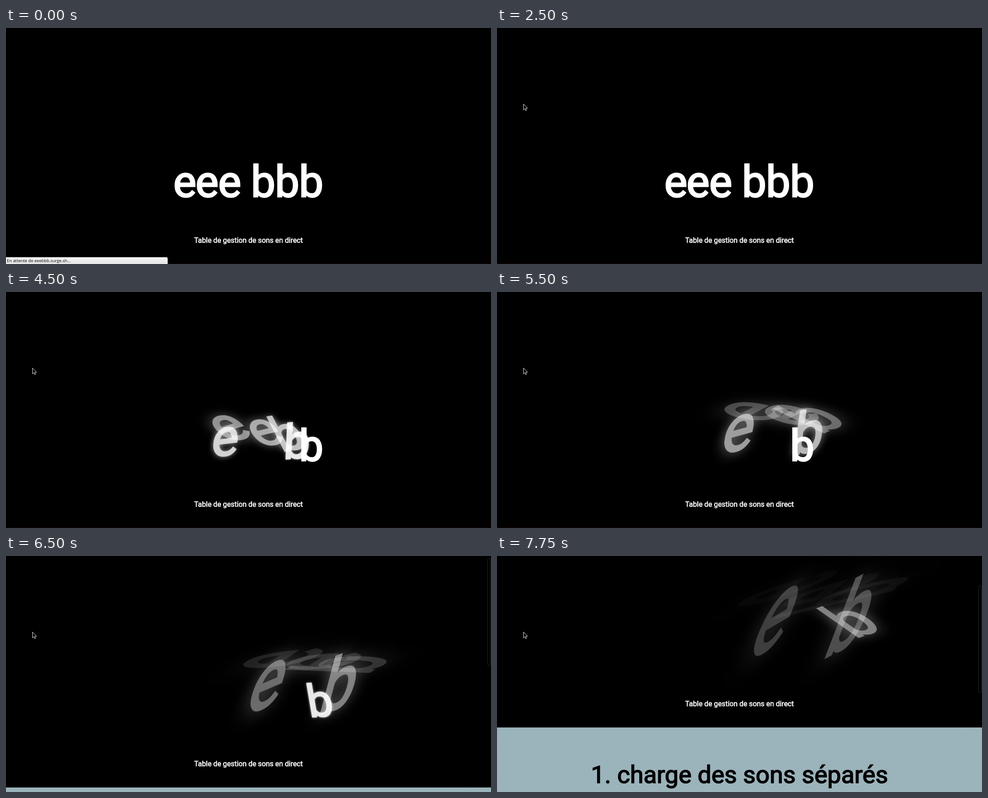
Recreate the animation shown at these times as an HTML page. Size 1071 px wide and 523 px high, loop 8 s.

```html
<!DOCTYPE html>
<html lang="fr">
<head>
<meta charset="utf-8">
<title>eee bbb</title>
<style>
  html, body { margin: 0; width: 100%; height: 100%; overflow: hidden; background: #000; }
  body, #page { position: relative; font-family: Roboto, sans-serif; }
  #page { width: 1071px; height: 523px; }
  #page *, body > * { position: absolute; white-space: pre; }
  .wide { left: 0; width: 1071px; text-align: center; }
  .letter {
    top: 290.5px; width: 60px; text-align: center; color: #fff;
    font-size: 96px; line-height: 100px; -webkit-text-stroke: .031em #fff;
    transform-origin: 50% 45px;
  }
  #tagline { top: 460.6px; font-size: 15.85px; line-height: 20px; color: #fff; -webkit-text-stroke: .6px #fff; }
  #steps { top: 522.5px; height: 523px; background: #9bb3bb; }
  #steps h2 {
    margin: 0; top: 75.6px; font-size: 54px; font-weight: 400; line-height: 60px;
    color: #000; -webkit-text-stroke: .031em #000;
  }
  #dot { width: 1px; height: 1px; left: 0; top: 0; }
  #edge { left: 0; top: 522px; width: 1071px; height: 1px; background: #180406; }
  #thumb { left: 1063px; width: 7px; height: 238px; border: 1px solid #262626; border-radius: 5px; box-sizing: border-box; }
  #status {
    left: 0; top: 508px; width: 357px; height: 15px; padding-left: 2px; box-sizing: border-box;
    background: linear-gradient(#f6f6f6, #e4e4e4); border-radius: 0 3px 0 0;
    font: 9.4px/15px "Open Sans", sans-serif; color: #000;
  }
</style>
</head>
<body>
<div id="page">
  <div id="tagline" class="wide">Table de gestion de sons en direct</div>
  <div id="steps" class="wide"><i id="dot"></i><h2 class="wide">1. charge des sons séparés</h2></div>
</div>
<div id="edge"></div>
<div id="thumb"></div>
<div id="status">En attente de eeebbb.surge.sh...</div>
<svg id="cursor" width="12" height="17" style="left:0;top:0">
  <path d="M.5.5v13l3-2.8 1.9 4.4 2-.8-1.9-4.4h4z" fill="#000" stroke="#e4e4e4"/>
</svg>
<script>
const LOOP = 8000, STEP = 250, REM = 13.6;
const $ = id => document.getElementById(id);

// character, centre x, start of its drift; every second one mirrors the lean
const letters = [
  ['e', 395, 2875], ['e', 444, 3030], ['e', 494, 3125],
  ['b', 567.5, 3375], ['b', 620.5, 3500], ['b', 673.5, 5900]
];
const mirrored = [1, 4];

const drifts = letters.map(([char, x, delay], i) => {
  const mirror = mirrored.includes(i);
  const [dx, skew, scale] = mirror ? [18, -70, 2] : [15, 70, 1.5];
  const el = document.createElement('span');
  el.className = 'letter';
  el.textContent = char;
  el.style.left = x - 30 + 'px';
  $('page').append(el);
  const anim = el.animate([
    { transform: 'translate(0,0) rotate(0deg) skewX(0deg) scale(1)', opacity: 1,
      textShadow: '0 0 0 whitesmoke', easing: 'ease' },
    { offset: .6, textShadow: '0 0 28px whitesmoke', easing: 'ease' },
    { transform: `translate(${dx * REM}px,${-8 * REM}px) rotate(-40deg) skewX(${skew}deg) scale(${scale})`,
      opacity: 0, textShadow: '0 0 14px whitesmoke' }
  ], { duration: mirror ? 10350 : 6300, delay, fill: 'both' });
  anim.pause();
  return anim;
});

// faint specks on the blue panel
let seed = 7;
const rnd = () => (seed = seed * 16807 % 2147483647) / 2147483647;
$('dot').style.boxShadow = Array.from({ length: 75 }, () =>
  `${rnd() * 1071 | 0}px ${rnd() * 180 | 0}px rgba(255,255,255,${.15 + rnd() * .25})`).join();

// scroll position at each step from 5750 ms on
const scrolls = [6, 8, 8, 10, 50, 105, 128, 138, 143];

function draw(t) {
  t = Math.floor(t / STEP) * STEP;
  drifts.forEach(a => a.currentTime = t);

  const scroll = t < 5750 ? 0 : scrolls[(t - 5750) / STEP];
  $('page').style.transform = `translateY(${-scroll}px)`;
  $('thumb').style.top = scroll * .457 + 'px';
  $('thumb').style.opacity = scroll ? 1 : 0;
  $('edge').style.opacity = scroll ? 0 : 1;
  $('status').style.opacity = t < 250 ? 1 : t < 500 ? .5 : 0;

  const [x, y] = t < 500 ? [508, 89] : t < 750 ? [493, 95] : [58, 168];
  $('cursor').style.transform = `translate(${x}px,${y}px)`;
  $('cursor').style.opacity = t < 250 ? 0 : 1;
}

const start = performance.now();
function tick() {
  draw((performance.now() - start) % LOOP);
  requestAnimationFrame(tick);
}
tick();
</script>
</body>
</html>
```
